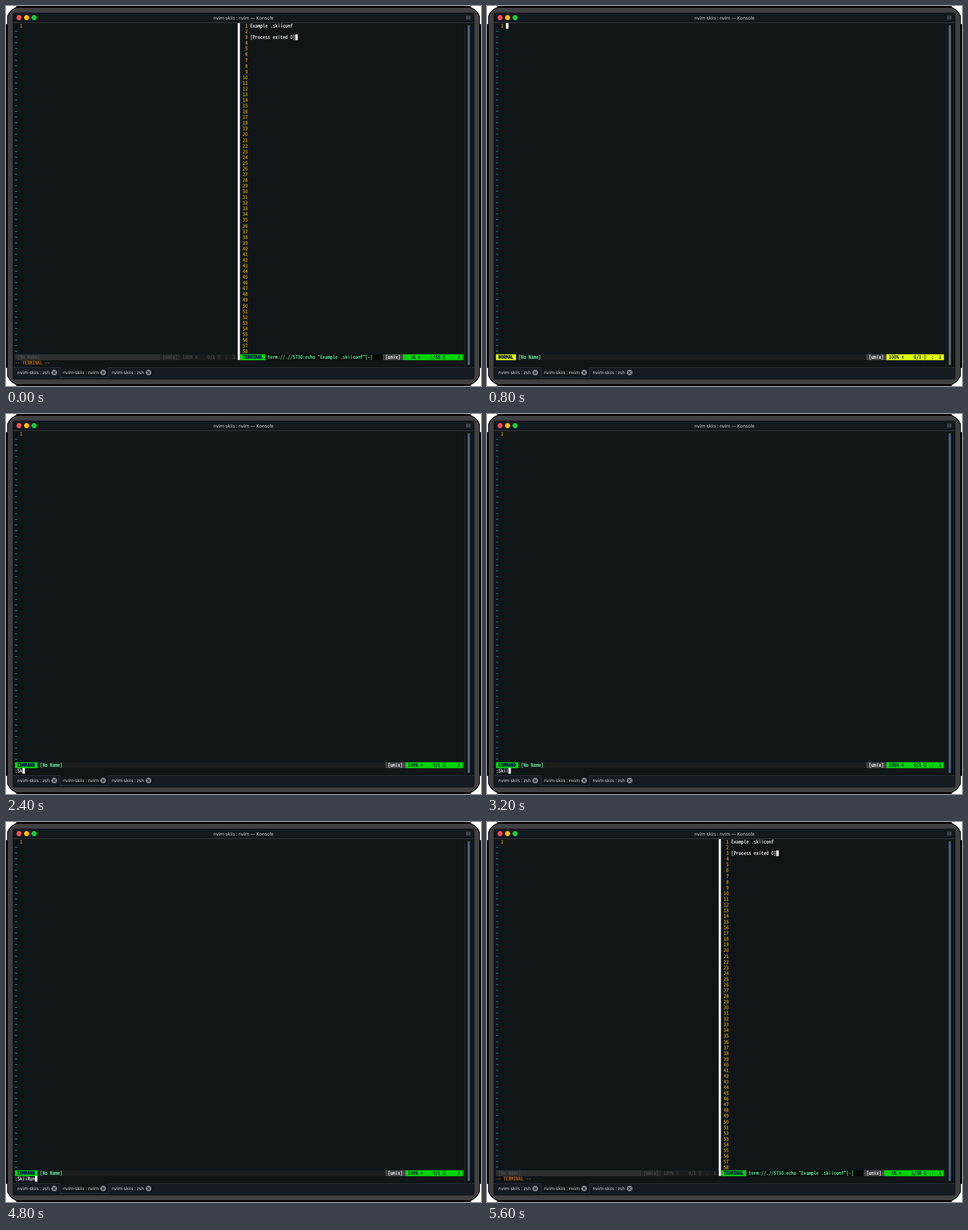
Recreate the animation shown at these times as an HTML page. Size 836 px wide and 670 px high, loop 8 s.

```html
<!DOCTYPE html>
<html lang="en">
<head>
<meta charset="utf-8">
<title>nvim-skiis</title>
<style>
  html, body { margin: 0; width: 100%; height: 100%; overflow: hidden; background: #000; }
  svg { display: block; width: 836px; height: 670px; }
  text { white-space: pre; text-rendering: geometricPrecision; }
  .ui { font: 8.14px "Noto Sans", "Open Sans", sans-serif; fill: #d3d8dc; }
  .term { font-family: "Noto Sans Mono CJK JP", "Noto Sans Mono", monospace; stroke-width: .2; }
  .bold { font-weight: 700; }
</style>
</head>
<body>
<svg id="stage" viewBox="0 0 836 670"></svg>
<script>
const NS = 'http://www.w3.org/2000/svg';
const stage = document.getElementById('stage');
const CELL = 4.405, ROW = 10.07, LEFT = 15.7, TOP = 30;
const STATUS = 58, PROMPT = 59, COLS = 179;
const C = {
  bg: '#101518', bar: '#161b21', line: '#353b40', num: '#d9a40c', tilde: '#1496aa',
  text: '#f2f2f2', name: '#5fffaf', navy: '#00005f', green: '#00d700', lime: '#dfff00',
  unix: '#444444', dim: '#4e4e4e', mode: '#b8691a', thumb: '#4a6282', thumbOff: '#606568'
};

function add(parent, tag, attrs, content) {
  const el = document.createElementNS(NS, tag);
  for (const k in attrs) el.setAttribute(k, attrs[k]);
  if (content !== undefined) el.textContent = content;
  parent.appendChild(el);
  return el;
}
const box = (p, x, y, width, height, fill, more) => add(p, 'rect', { x, y, width, height, fill, ...more });
const colX = c => LEFT + c * CELL;
const rowY = r => TOP + r * ROW;

// Font size that makes one glyph exactly one cell wide
function cellFontSize() {
  const ctx = document.createElement('canvas').getContext('2d');
  ctx.font = '100px "Noto Sans Mono CJK JP", "Noto Sans Mono", monospace';
  return CELL / ctx.measureText('M').width * 100;
}

function put(p, col, row, str, fill, style = '') {
  const y = rowY(row);
  [...str].forEach((ch, i) => {
    const x = colX(col + i);
    if (ch === '≡') {
      add(p, 'path', { d: [3.4, 5.1, 6.8].map(d => `M${x + .4} ${y + d}h3.6`).join(''), stroke: fill, 'stroke-width': .8 });
    } else if (ch === '▯') {
      box(p, x + .5, y + 1.9, 3.3, 6.4, 'none', { stroke: fill, 'stroke-width': .5 });
      add(p, 'path', { d: `M${x + 1.3} ${y + 4}h1.6M${x + 1.3} ${y + 6.2}h1.6`, stroke: fill, 'stroke-width': .5 });
    }
  });
  return add(p, 'text', { x: colX(col), y: y + 8.1, fill, stroke: fill, class: style }, str.replace(/[≡▯]/g, ' '));
}

function seg(p, from, to, bg, str, fill, style) {
  box(p, colX(from), rowY(STATUS), (to - from) * CELL, ROW + .3, bg);
  put(p, from, STATUS, str, fill, style);
}

const cursor = (p, col, row) => box(p, colX(col), rowY(row), CELL, ROW, '#f4f4f4');

// One ring of the window border, inset by i, with cut corners
function ring(i, fill, stroke, width = 1) {
  const a = 3 + i, r = 833 - i, b = 667 - i, k = Math.max(4, 15 - i), q = k * .3;
  add(stage, 'path', {
    d: `M${a} ${a + k}Q${a + q} ${a + q} ${a + k} ${a}H${r - k}Q${r - q} ${a + q} ${r} ${a + k}` +
       `V${b - k}Q${r - q} ${b - q} ${r - k} ${b}H${a + k}Q${a + q} ${b - q} ${a} ${b - k}Z`,
    fill, stroke, 'stroke-width': width
  });
}

function frame() {
  [[0, 0], [818, 0], [0, 638], [818, 638]].forEach(([x, y]) => box(stage, x, y, 18, 32, '#fff'));
  ring(-.2, '#3c3b3d', '#000', 1.6);
  ring(1, '#403f41', '#4b4a4c');
  ring(6, '#39383a', '#484749');
  box(stage, 12, 12, 812, 646, '#0b0e10', { rx: 2 });
  box(stage, 13, 12.5, 810, 644.5, C.bg, { rx: 1.5 });
}

function closeIcon(x) {
  add(stage, 'circle', { cx: x, cy: 646.3, r: 5, fill: '#7f858a' });
  add(stage, 'path', { d: `M${x - 2} 644.3l4 4m0-4l-4 4`, stroke: '#171c21', 'stroke-width': 1.1 });
}

function chrome() {
  frame();
  box(stage, 13, 12.5, 810, 17, '#14191d');
  box(stage, 13, 29, 810, 1, C.line);
  ['#fb4a58', '#fcbc10', '#14cf40'].forEach((fill, i) =>
    add(stage, 'circle', { cx: 23 + i * 13.2, cy: 20.5, r: 4.5, fill }));
  add(stage, 'text', { x: 418, y: 23.6, class: 'ui', 'text-anchor': 'middle' }, 'nvim-skiis : nvim — Konsole');
  box(stage, 809.5, 17, 8, 7, '#3c4145');
  box(stage, 807, 30, 1, 607, '#22282c');

  box(stage, 13, 637, 810, 20, C.bar);
  box(stage, 13, 637, 810, 1, '#2b3137');
  add(stage, 'path', { d: 'M95.5 637V654.5H180.5V637', fill: C.bg, stroke: '#2f363c' });
  [[20, 'zsh', 85], [100, 'nvim', 171], [186, 'zsh', 251]].forEach(([x, cmd, close]) => {
    add(stage, 'text', { x, y: 649.2, class: 'ui' }, 'nvim-skiis : ' + cmd);
    closeIcon(close);
  });
}

const position = ' 100% ≡    0/1 ▯  :  1 ';
const layer = () => add(stage, 'g', { class: 'term', 'font-size': cellFontSize() });

function emptyBuffer() {
  const g = layer();
  put(g, 2, 0, '1', C.num);
  for (let r = 1; r < STATUS; r++) put(g, 0, r, '~', C.tilde, 'bold');
}

function modeLayer(mode, color) {
  const g = layer(), end = mode.length + 2;
  seg(g, end, 148, '#1c1c1c', ' [No Name]', C.name);
  seg(g, 0, end, color, ` ${mode} `, C.navy, 'bold');
  seg(g, 148, 156, C.unix, ' [unix] ', '#fff');
  seg(g, 156, COLS, color, position, C.navy);
  return g;
}

function splitLayer() {
  const g = layer();
  box(g, colX(89), TOP, 4, rowY(PROMPT) - TOP, '#f4f4f4');
  for (let r = 0; r < STATUS; r++) put(g, 91, r, String(r + 1).padStart(2), C.num);
  put(g, 94, 0, 'Example .skiiconf', C.text);
  put(g, 94, 2, '[Process exited 0]', C.text);
  cursor(g, 112, 2);
  seg(g, 0, 58, '#303030', ' [No Name]', C.dim);
  seg(g, 58, 66, '#262626', ' [unix] ', C.dim);
  seg(g, 66, 89, '#1c1c1c', position, C.dim);
  seg(g, 100, 147, '#080808', ' term://.//5730:echo "Example .skiiconf"[-]', C.name);
  seg(g, 90, 100, C.green, ' TERMINAL ', C.navy, 'bold');
  seg(g, 147, 155, C.unix, ' [unix] ', '#fff');
  seg(g, 155, COLS, C.green, '   1% ≡    1/58 ▯  :  1 ', C.navy);
  put(g, 0, PROMPT, '-- TERMINAL --', C.mode);
  return g;
}

chrome();
const thumb = box(stage, 812.5, 34, 4, 599, C.thumb, { rx: 1.5 });
emptyBuffer();
const split = splitLayer();
const normal = modeLayer('NORMAL', C.lime);
cursor(normal, 4, 0);
const command = modeLayer('COMMAND', C.green);
const typed = put(command, 0, PROMPT, '', C.text);
const caret = cursor(command, 1, PROMPT);

const STEP = 800, LOOP = 8000;
const steps = ['split', 'normal', ':', ':Sk', ':Skii', ':SkiiRu', ':SkiiRun', 'split'];
const show = (el, on) => el.setAttribute('visibility', on ? 'visible' : 'hidden');
const start = performance.now();
let last = -1;

function draw(now) {
  const t = Math.max(0, now - start) % LOOP;
  const i = Math.min(Math.floor(t / STEP), steps.length - 1);
  if (i !== last) {
    const s = steps[last = i], typing = s[0] === ':';
    show(split, s === 'split');
    show(normal, s === 'normal');
    show(command, typing);
    thumb.setAttribute('fill', s === 'normal' ? C.thumbOff : C.thumb);
    if (typing) {
      typed.textContent = s;
      caret.setAttribute('x', colX(s.length));
    }
  }
  requestAnimationFrame(draw);
}
draw(start);
</script>
</body>
</html>
```
